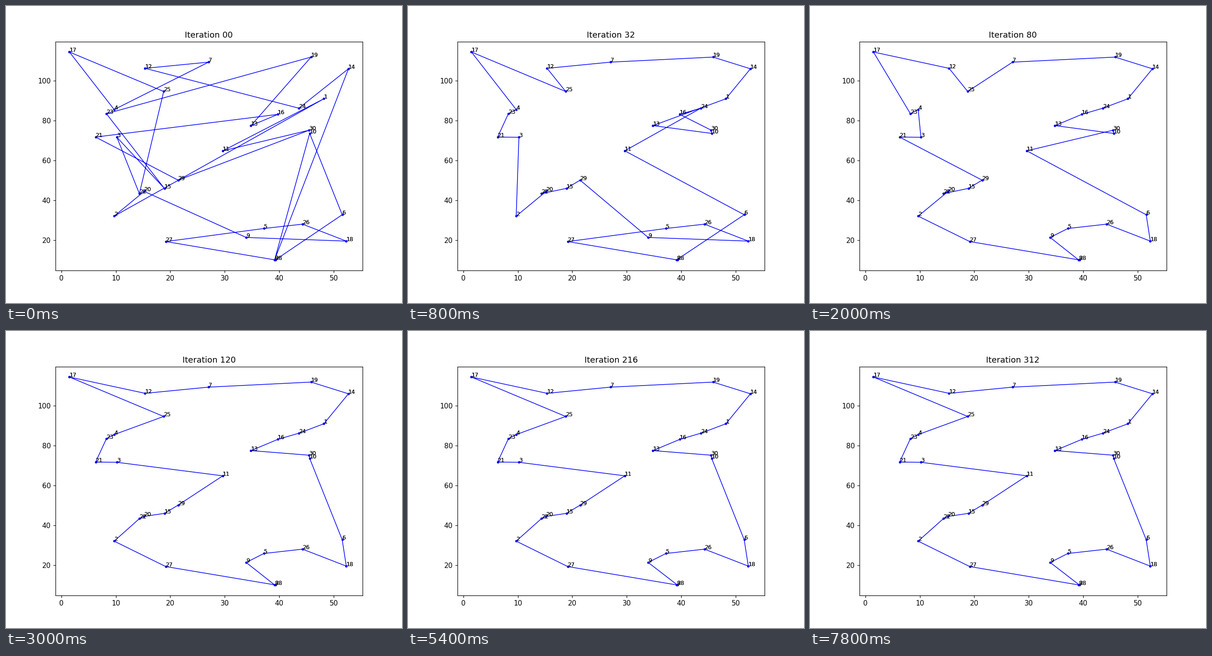
A matplotlib script for the animation above (8 s loop, 864 px wide and 648 px high).

```python
import matplotlib.pyplot as plt
from matplotlib.animation import FuncAnimation

FRAMES, INTERVAL, STEP = 40, 200, 8

# City 1 comes first.
CITIES = [
    (48.18, 90.94), (9.71, 32.17), (10.21, 71.65), (9.71, 85.54), (37.17, 25.97),
    (51.55, 32.86), (27.03, 109.30), (39.14, 10.24), (33.93, 21.49), (45.58, 73.60),
    (29.64, 64.88), (15.38, 106.20), (34.81, 77.51), (52.696, 105.97), (18.92, 46.06),
    (39.73, 83.13), (1.50, 114.36), (52.30, 19.66), (45.83, 111.83), (15.21, 44.56),
    (6.30, 71.77), (14.33, 43.42), (8.28, 83.48), (43.60, 86.23), (18.79, 94.61),
    (44.27, 28.15), (19.17, 19.43), (39.27, 10.23), (21.44, 50.19), (45.49, 75.21),
]

# Tours found early in the search, keyed by the step at which they appear.
tours = {
    0: "17 25 22 3 15 23 19 13 16 21 29 30 11 1 2 20 9 18 26 5 27 28 6 10 8 14 24 12 7 4",
    1: "17 4 7 12 24 1 14 19 13 16 30 10 6 8 28 27 5 26 18 9 29 15 11 20 2 22 3 21 23 25",
    2: "17 12 3 23 21 15 29 9 18 26 5 27 28 8 6 22 2 20 11 24 7 4 16 30 10 13 1 14 19 25",
    3: "17 25 12 7 19 14 1 13 10 30 16 24 11 6 8 28 27 5 26 18 9 29 15 22 20 2 3 21 23 4",
    5: "17 12 25 16 24 7 19 14 1 13 10 30 11 6 5 26 18 9 8 28 27 2 20 22 15 29 3 21 4 23",
}

# Later improvements only rearrange short stretches of the tour.
moves = [
    (7, [("6 5 26 18 9", "6 18 26 5 9")]),
    (8, [("29 3 21 4", "29 21 3 4")]),
    (10, [("25 16 24 7", "25 7"), ("1 13", "1 24 16 13")]),
    (13, [("13 10 30 11 6", "13 30 10 6"), ("2 20 22 15", "2 22 20 15"),
          ("29 21 3 4", "29 11 3 21 4")]),
    (15, [("12 25 7", "12 7"), ("21 4 23", "21 23 4 25")]),
    (21, [("9 8 28 27", "9 28 8 27")]),
]
tour = tours[5]
for start, edits in moves:
    for old, new in edits:
        tour = tour.replace(old, new)
    tours[start] = tour


def path(step):
    order = [int(c) for c in tours[max(s for s in tours if s <= step)].split()]
    loop = [CITIES[c - 1] for c in order + order[:1]]
    return zip(*loop)


fig, ax = plt.subplots(figsize=(8, 6), dpi=108)
line, = ax.plot(*zip(*CITIES), "b.-", lw=1, ms=5)
# Every city is labelled once per adjoining edge, hence twice.
for label, (x, y) in enumerate(CITIES, 1):
    for _ in range(2):
        ax.text(x, y, str(label), fontsize=8)
title = ax.set_title("")


def update(step):
    line.set_data(*map(list, path(step)))
    title.set_text(f"Iteration {step * STEP:02d}")
    return line, title


anim = FuncAnimation(fig, update, frames=FRAMES, interval=INTERVAL,
                     repeat=True, repeat_delay=0, blit=False)
plt.show()
```
